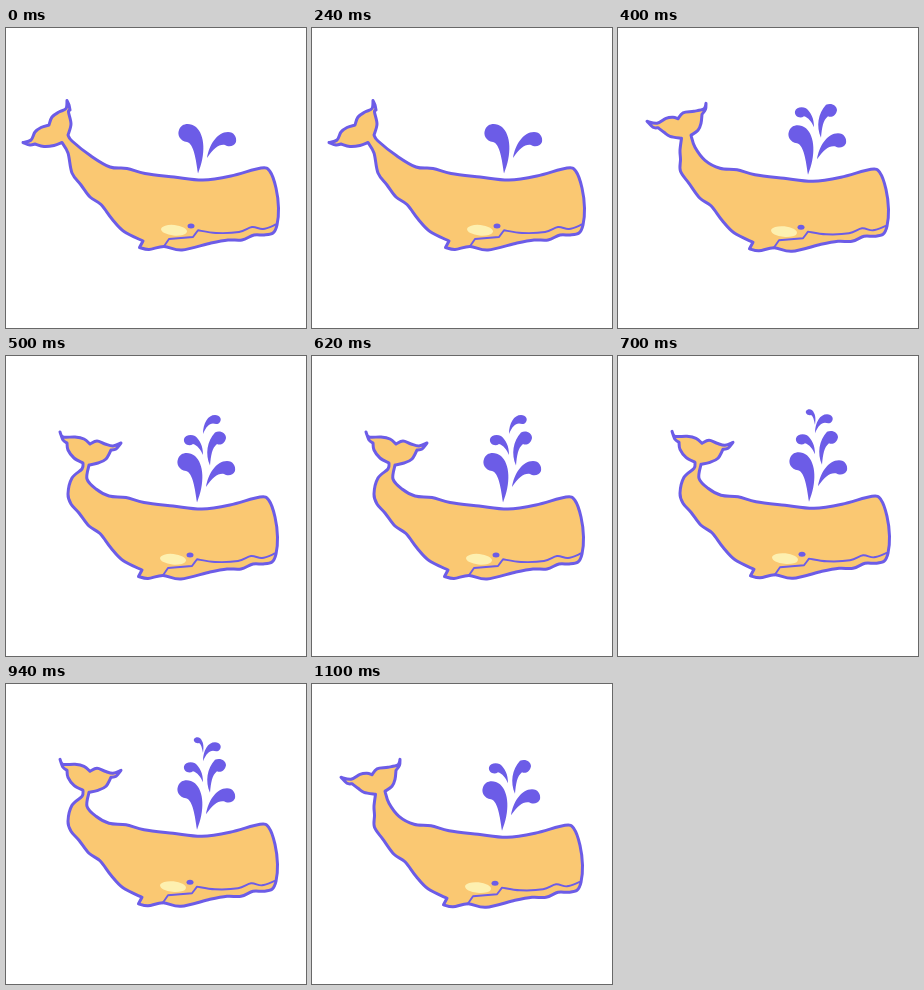
Animation of 300x300 px, one loop 1300 ms. Source, as an HTML page with a canvas:

```html
<!DOCTYPE html>
<html lang="en">
<head>
<meta charset="utf-8">
<title>Whale</title>
<style>
  html, body { margin: 0; width: 100%; height: 100%; overflow: hidden; background: #fff; }
  canvas { display: block; width: 300px; height: 300px; }
</style>
</head>
<body>
<canvas id="stage"></canvas>
<script>
const SIZE = 300, LOOP = 1300;
const PURPLE = '#6c5ce7', SKIN = '#fac872', CHEEK = '#fdf0b0';

const canvas = document.getElementById('stage');
const ratio = window.devicePixelRatio || 1;
canvas.width = canvas.height = SIZE * ratio;
const ctx = canvas.getContext('2d');

// Smooth curve through "x,y" points; "|" marks a sharp corner.
function curve(text) {
  const path = new Path2D();
  let last = null;
  for (const part of text.split('|')) {
    const pts = part.trim().split(/\s+/).map(p => p.split(',').map(Number));
    if (last) pts.unshift(last);
    else path.moveTo(...pts[0]);
    const at = i => pts[Math.max(0, Math.min(pts.length - 1, i))];
    for (let i = 0; i < pts.length - 1; i++) {
      const [a, b, c, d] = [at(i - 1), at(i), at(i + 1), at(i + 2)];
      path.bezierCurveTo(
        b[0] + (c[0] - a[0]) / 6, b[1] + (c[1] - a[1]) / 6,
        c[0] - (d[0] - b[0]) / 6, c[1] - (d[1] - b[1]) / 6, c[0], c[1]);
    }
    last = pts[pts.length - 1];
  }
  return path;
}

const belly = '137,213 118,203.5 106,191 95,176.5 84,169 ';
const back = ' 104,139 121,140.5 139,145.5 168,149 197,152 225,148 255,140 264,143.5 ' +
  '270,160 272.5,180 271,197 267,205 258,207 248,207 236,212 222,212 ' +
  '205,215 176,222 158,218.5 143,221.5 133.5,219.5 | 137,213';

const tails = {
  back: '75,157 66,145 62,125 56,114.5 | 48,117.5 38,118.5 29,116 | 24,117 17,114.5 | ' +
    '25,112 29,104 35,99.5 43,97 | 46,89 53,84 60,80.5 61,72.5 | 63,77 64,82 | ' +
    '62.5,84 65,96 62,107 | 66,113 85,128',
  mid: '73,154 64.5,142 64.5,130 64,121 65.5,109 | 54,107 48,103 42,98.5 | 37,98 31,92 | ' +
    '41,94 50,89 57,88 62,89.5 | 67,83.5 78,82 88,79.5 90,74 | 89.5,80 86,85 | ' +
    '85,94 82,101 75,106 | 79,118 89,131',
  up: '74,156 66,147 63,137 67,121 77,112 78,106 | 69,101 63,93 62,86 | 58,83 55,75 | ' +
    '58,80 70,80 79,82 85,87 | 92,84 100,87 108,89 116,86 | 111,92 106,93 | ' +
    '101,102 93,106 84,108 | 82,122 91,132'
};

const mouth = curve('157.5,219 | 163,211 | 187,209 | 192,202.3 | 210,205 233,204 246,199 257,201 270,196.5');

const drops = [
  'M192 145.5C190 132 188 116 181 114C174 113 171 107 173 102C175 95 184 94 190 99C199 107 200 126 192 145.5Z',
  'M201 130C203 117 211 104 222 104C228 104 231 109 230 114C228 119 222 119 219 117C213 116 208 120 201 130Z',
  'M198 98C196 93 192 88 188 87C184 90 178 87 179 82C180 78 186 77 190 79C195 83 198 89 198 98Z',
  'M205 108.5C200 97 202 84 210 75.5C215 73 221 76 221 81C220 87 215 88.5 212 87C207 91 206 98 205 108.5Z',
  'M198 77C198 66 203 58 210 58C215 58 217 62 215 65C213 68 210 67 208 66.5C204 66.5 201 70 198 77Z',
  'M198 68.7C197 63 196 60 194 58.7C191 59.7 188 57 189 54.7C191 51.7 196 52.7 197 56.7C199 60 198.5 65 198 68.7Z'
].map(d => new Path2D(d));

const pose = (tail, x, y, count) => ({ body: curve(belly + tails[tail] + back), x, y, count });
const rest = pose('back', 0, 0, 2);
const lift = pose('mid', -2, 1.3, 4);
const raise = pose('up', -1, 1, 5);
const spray = pose('up', -1, 0.3, 6);

const steps = [[400, rest], [500, lift], [700, raise], [1100, spray], [LOOP, lift]];

function oval(x, y, rx, ry, turn, color) {
  ctx.fillStyle = color;
  ctx.beginPath();
  ctx.ellipse(x, y, rx, ry, turn, 0, Math.PI * 2);
  ctx.fill();
}

function draw({ body, x, y, count }) {
  ctx.setTransform(ratio, 0, 0, ratio, 0, 0);
  ctx.fillStyle = '#fff';
  ctx.fillRect(0, 0, SIZE, SIZE);
  ctx.translate(x, y);
  ctx.lineJoin = ctx.lineCap = 'round';
  ctx.strokeStyle = PURPLE;

  ctx.fillStyle = SKIN;
  ctx.fill(body);
  ctx.lineWidth = 3;
  ctx.stroke(body);
  ctx.lineWidth = 1.9;
  ctx.stroke(mouth);

  oval(168, 202.3, 13, 5.3, 0.1, CHEEK);
  oval(185, 198, 3.5, 2.5, 0, PURPLE);

  ctx.fillStyle = PURPLE;
  drops.slice(0, count).forEach(d => ctx.fill(d));
}

function tick() {
  const t = performance.now() % LOOP;
  draw(steps.find(([end]) => t < end)[1]);
  requestAnimationFrame(tick);
}
tick();
</script>
</body>
</html>
```
